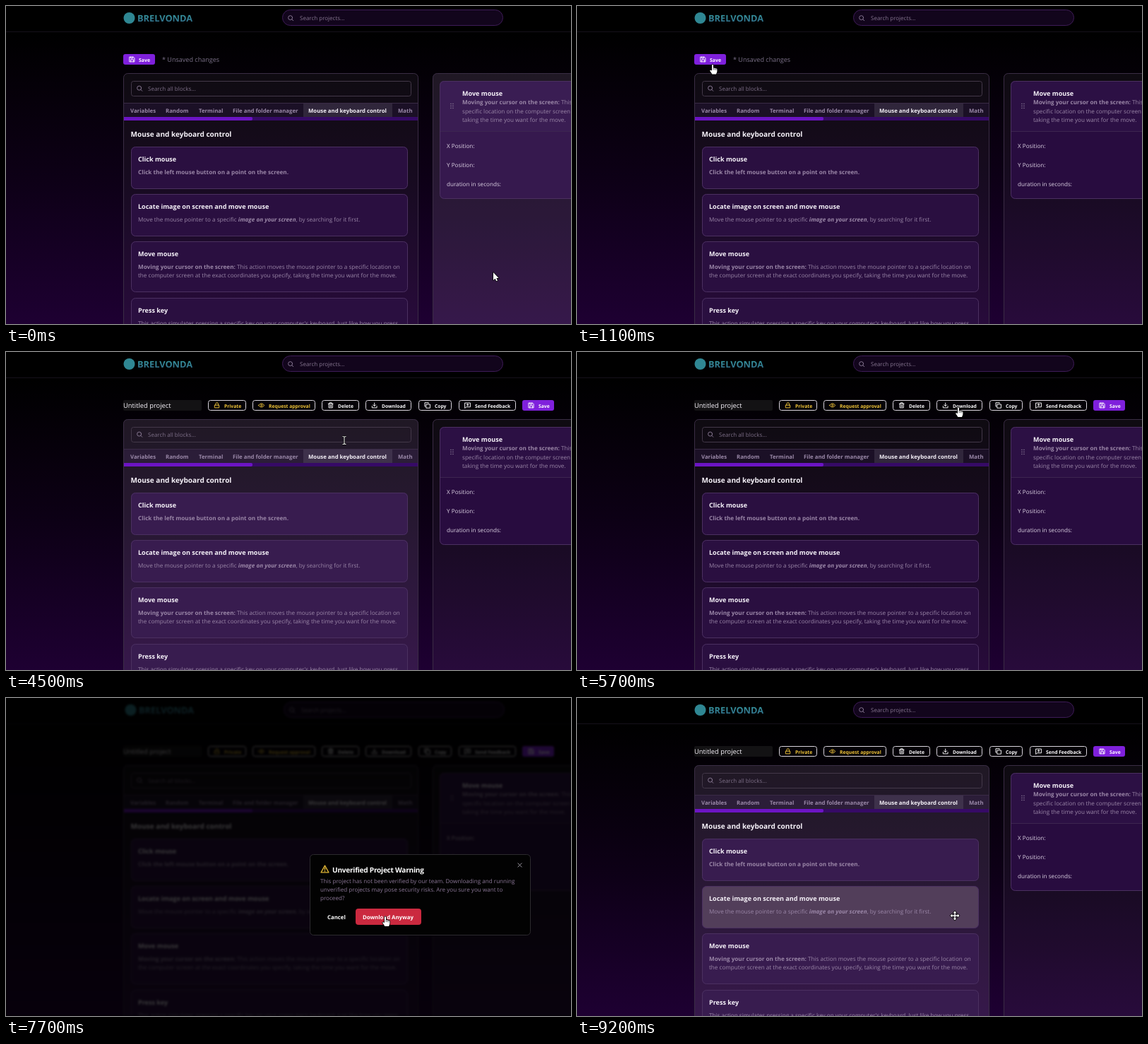
Animation, 800 px wide and 450 px high, one loop 9.3 s. Source, as an HTML page with a canvas:

```html
<!DOCTYPE html>
<html lang="en">
<head>
<meta charset="utf-8">
<title>Block editor</title>
<style>
html, body { margin: 0; width: 100%; height: 100%; overflow: hidden; background: #000; }
canvas { display: block; width: 800px; height: 450px; }
</style>
</head>
<body>
<canvas id="stage" width="800" height="450"></canvas>
<script>
const W = 800, H = 450, LOOP = 9300, STEP = 100;
const SAVED = 1800, OPEN = 5800, CLOSING = 8300, CLOSED = 8400;
const FONT = '"Open Sans", "Noto Sans", sans-serif';
const MUTED = '#9a86a7', BRIGHT = '#f6f2f9', YELLOW = '#f2c638', PURPLE = '#7f20dc';
const PANEL = 'rgba(255,255,255,.045)', PANEL_LINE = '#3a2d44', CARD_LINE = '#4b3060';

const out = document.getElementById('stage').getContext('2d');
const page = document.createElement('canvas');
page.width = W;
page.height = H;
let c = page.getContext('2d');

// Pointer path: time, x, y
const PATH = [
  [0, 690, 377], [900, 192, 82.5], [1900, 192, 82.5], [2300, 189, 77], [3000, 189, 77],
  [4300, 479, 125], [4600, 479, 125], [5400, 540, 78], [6400, 540, 78],
  [7500, 537, 309], [8400, 537, 309], [8700, 535, 308]
];
const LEFT = [166, 95, 418, 400], RIGHT = [604, 95, 240, 400];
const SEARCH = [177, 106, 397, 22], NAME = [166, 68, 111, 16], CONFIRM = [495, 298, 93, 23];
const CARDS = [
  { box: [177, 199, 392, 60], title: 'Click mouse',
    lines: [[['Click the left mouse button on a point on the screen.', 700]]] },
  { box: [177, 266, 392, 60], title: 'Locate image on screen and move mouse',
    lines: [[['Move the mouse pointer to a specific '], ['image on your screen', 700, 'italic '], [', by searching for it first.']]] },
  { box: [177, 333, 392, 72], title: 'Move mouse',
    lines: [[['Moving your cursor on the screen:', 700], [' This action moves the mouse pointer to a specific location on']],
      [['the computer screen at the exact coordinates you specify, taking the time you want for the move.']]] },
  { box: [177, 413, 392, 72], title: 'Press key',
    lines: [[["This action simulates pressing a specific key on your computer's keyboard. Just like how you press"]]] }
];
const TABS = [['Variables', 176], ['Random', 226], ['Terminal', 273], ['File and folder manager', 321],
  ['Mouse and keyboard control', 428], ['Math', 555]];
const BUTTONS = [['Private', 286, 54, 'lock'], ['Request approval', 349, 89, 'eye'], ['Delete', 447, 53, 'bin'],
  ['Download', 509, 65, 'down'], ['Copy', 584, 47, 'copy'], ['Send Feedback', 641, 81, 'note'], ['Save', 731, 45, 'disk']];

// Icons on a 24 unit grid
const ICONS = {
  lock: 'M4 11h16v10H4zM7 11V7a5 5 0 0 1 10 0v4',
  eye: 'M1 12Q12 -2 23 12Q12 26 1 12zM15 12a3 3 0 1 1-6 0a3 3 0 1 1 6 0',
  bin: 'M3 6h18M5 6v15h14V6M8 6V2h8v4M10 11v6M14 11v6',
  down: 'M12 3v12M7 10l5 5l5-5M3 15v6h18v-6',
  copy: 'M8 8h14v14H8zM4 16H2V2h14v2',
  note: 'M2 3h20v15H7l-5 4zM12 6v8M8 10h8',
  disk: 'M3 3h14l4 4v14H3zM7 3v5h8V3M7 21v-8h10v8',
  find: 'M19 11a8 8 0 1 1-16 0a8 8 0 1 1 16 0M17 17l5 5',
  warn: 'M12 3L22 21H2zM12 9v5M12 17v1',
  cross: 'M5 5l14 14M19 5L5 19'
};
const POINTERS = {
  arrow: 'M0 0V11L2.6 8.7L4.2 12.2L6 11.4L4.4 8H7.6z',
  hand: 'M-1 1Q0 -.6 1 1V5.2Q2.2 4.4 3 5.6Q4.2 5 4.9 6.2Q6.4 5.8 6.4 7.4V10Q6 11.8 5 14H-.7Q-2 11.5 -3.8 9.2Q-3.6 7.4 -1 9z',
  ibeam: 'M-2.5 -5.5Q0 -5.5 0 -4.5Q0 -5.5 2.5 -5.5M0 -4.5V4.5M-2.5 5.5Q0 5.5 0 4.5Q0 5.5 2.5 5.5',
  move: 'M0 -6.5L2.4 -3.8H.7V-.7H3.8V-2.4L6.5 0L3.8 2.4V.7H.7V3.8H2.4L0 6.5L-2.4 3.8H-.7V.7H-3.8V2.4L-6.5 0L-3.8 -2.4V-.7H-.7V-3.8H-2.4z'
};

const inside = ([x, y, w, h], p) => p.x >= x && p.x <= x + w && p.y >= y && p.y <= y + h;

function pointer(t) {
  let i = PATH.length - 1;
  while (i > 0 && PATH[i][0] > t) i--;
  const a = PATH[i], b = PATH[i + 1] || a;
  const k = b === a ? 0 : (t - a[0]) / (b[0] - a[0]);
  const e = k * k * (3 - 2 * k);
  return { x: a[1] + (b[1] - a[1]) * e, y: a[2] + (b[2] - a[2]) * e };
}

const modal = t => t >= OPEN && t < CLOSED;

// Hover strength: share of the last 300 ms spent over a box
function hover(box, t) {
  let n = 0;
  for (let i = 0; i < 15; i++) {
    const s = Math.max(0, t - i * 20);
    if (!modal(s) && inside(box, pointer(s))) n++;
  }
  return n / 15;
}

const panelGlow = (panel, t) => `rgba(200,150,225,${.09 * hover(panel, t)})`;

function pointerKind(t, p) {
  if (modal(t)) return inside(CONFIRM, p) ? 'hand' : 'arrow';
  if (t < SAVED && inside([166, 68, 45, 16], p)) return 'hand';
  if (t >= SAVED) {
    if (inside(NAME, p)) return 'ibeam';
    if (BUTTONS.some(b => inside([b[1], 68, b[2], 16], p))) return 'hand';
  }
  if (inside(SEARCH, p)) return 'ibeam';
  return CARDS.some(k => inside(k.box, p)) ? 'move' : 'arrow';
}

function text(s, x, y, size, color, weight = 400, style = '') {
  c.font = `${style}${weight} ${size}px ${FONT}`;
  c.textRendering = 'geometricPrecision';
  c.fillStyle = color;
  c.fillText(s, x, y);
  return x + c.measureText(s).width;
}

function runs(parts, x, y) {
  for (const [s, weight = 400, style = ''] of parts) x = text(s, x, y, 8.13, MUTED, weight, style);
}

function box([x, y, w, h], r, fill, line) {
  c.beginPath();
  c.roundRect(line ? x + .5 : x, line ? y + .5 : y, line ? w - 1 : w, line ? h - 1 : h, r);
  if (fill) { c.fillStyle = fill; c.fill(); }
  if (line) { c.strokeStyle = line; c.lineWidth = 1; c.stroke(); }
}

function icon(name, cx, cy, size, color) {
  c.save();
  c.translate(cx - size / 2, cy - size / 2);
  c.scale(size / 24, size / 24);
  c.strokeStyle = color;
  c.lineWidth = 2.5;
  c.lineCap = c.lineJoin = 'round';
  c.stroke(new Path2D(ICONS[name]));
  c.restore();
}

function vertical(y0, y1, ...stops) {
  const g = c.createLinearGradient(0, y0, 0, y1);
  stops.forEach((s, i) => g.addColorStop(i / (stops.length - 1), s));
  return g;
}

function drawHeader(t) {
  c.save();
  if (modal(t)) c.translate(2, 0);
  c.fillStyle = '#2f8793';
  c.beginPath();
  c.arc(174.5, 17, 8, 0, 7);
  c.fill();
  text('BRELVONDA', 186, 21.5, 12.8, vertical(9, 24, '#38a0a5', '#2f6a86'), 700);
  box([391, 5, 313, 23], 11, '#12051c', '#3e1c58');
  icon('find', 403, 17, 9, '#8c7c98');
  text('Search projects...', 416, 20, 8, '#85758f');
  c.restore();
  c.fillStyle = '#15101a';
  c.fillRect(0, 36, W, 1);
}

function drawToolbar(t) {
  if (t < SAVED) {
    box([166, 68, 45, 15], 3, PURPLE);
    icon('disk', 178.5, 75.5, 9, '#fff');
    text('Save', 188, 78.5, 6.9, '#fff', 700);
    text('* Unsaved changes', 221, 79, 9.05, '#7b7088');
    return;
  }
  box([166, 68, 111, 15], 2, '#131214');
  text('Untitled project', 166, 79, 9.35, BRIGHT);
  BUTTONS.forEach(([label, x, w, name], i) => {
    const ink = i < 2 ? YELLOW : '#fff';
    if (label === 'Save') box([x, 68, w, 15], 3, PURPLE);
    else box([x, 68, w, 15], 3, '#050208', '#d9d4dc');
    icon(name, x + 12.7, 75.5, 9, ink);
    text(label, x + 23, 78.5, 6.75, ink, 700);
  });
}

function drawLeft(t) {
  c.save();
  c.beginPath();
  c.roundRect(...LEFT, 6);
  c.clip();
  box(LEFT, 6, PANEL);
  c.fillStyle = '#1b1026';
  c.fillRect(166, 138, 418, 19);
  c.fillStyle = '#30263b';
  c.fillRect(421, 138, 126, 19);
  for (const k of CARDS) box(k.box, 6, '#2a0f40');
  c.fillStyle = panelGlow(LEFT, t);
  c.fillRect(...LEFT);
  c.fillStyle = '#3a2b46';
  c.fillRect(166, 137, 418, 1);
  c.fillStyle = '#360a66';
  c.fillRect(167, 157, 417, 5);
  c.fillStyle = '#6c14c4';
  c.beginPath();
  c.roundRect(167, 157, 182, 5, [0, 2, 2, 0]);
  c.fill();

  box(SEARCH, 3, null, '#433849');
  icon('find', 189, 116.5, 9, '#8c7c98');
  text('Search all blocks...', 201, 120, 8, '#7d6f87');
  TABS.forEach(([s, x], i) => text(s, x, 150.5, 7.8, i === 4 ? BRIGHT : '#9a88a8', 700));
  text('Mouse and keyboard control', 176.5, 184.5, 10.05, BRIGHT, 700);

  for (const k of CARDS) {
    const y = k.box[1];
    box(k.box, 6, `rgba(150,150,120,${.28 * hover(k.box, t)})`, CARD_LINE);
    text(k.title, 187, y + 21, 9.05, BRIGHT, 700);
    k.lines.forEach((line, i) => runs(line, 187, y + 39 + i * 12));
  }
  c.restore();
  box(LEFT, 6, null, PANEL_LINE);
}

function drawRight(t) {
  const card = [614, 106, 230, 167];
  box(RIGHT, 6, PANEL);
  box(card, 6, '#280c3f');
  box([614, 106, 230, 72], [6, 6, 0, 0], '#2c1044');
  box(RIGHT, 6, panelGlow(RIGHT, t), PANEL_LINE);
  box(card, 6, null, CARD_LINE);
  c.fillStyle = '#3d2550';
  c.fillRect(615, 177, 200, 1);
  c.fillStyle = '#8c7c98';
  for (let i = 0; i < 6; i++) c.fillRect(629.3 + i % 2 * 3, 137.8 + (i >> 1) * 3, 1.3, 1.3);
  text('Move mouse', 646, 127, 9.05, BRIGHT, 700);
  runs([['Moving your cursor on the screen:', 700], [' This action moves']], 646, 139);
  runs([['specific location on the computer screen at the']], 646, 151.5);
  runs([['taking the time you want for the move.']], 646, 164);
  ['X Position:', 'Y Position:', 'duration in seconds:'].forEach((s, i) => text(s, 624, 201 + i * 27, 8.15, '#dcd2e3'));
}

function drawPage(t) {
  c.fillStyle = vertical(37, H, '#000', '#0d0016', '#1e0032');
  c.fillRect(0, 0, W, H);
  c.fillStyle = '#000';
  c.fillRect(0, 0, W, 36);
  drawHeader(t);
  drawToolbar(t);
  drawLeft(t);
  drawRight(t);
}

function drawDialog(t, level) {
  c.save();
  c.globalAlpha = level;
  const s = .94 + .06 * level;
  c.translate(586.5, 278.5);
  c.scale(s, s);
  c.translate(-586.5, -278.5);
  box([430, 221, 313, 115], 5, '#020202', '#2c2a2e');
  icon('cross', 727.5, 236.5, 9, '#a39da8');
  icon('warn', 451.5, 242, 13, '#dcb234');
  c.letterSpacing = '-0.25px';
  text('Unverified Project Warning', 462, 246.5, 10.1, '#fff', 700);
  c.letterSpacing = '0px';
  ['This project has not been verified by our team. Downloading and running',
    'unverified projects may pose security risks. Are you sure you want to',
    'proceed?'].forEach((line, i) => text(line, 445, 261.5 + i * 12, 8.1, '#8b7797'));
  text('Cancel', 455, 312.5, 7.8, '#fff', 700);
  box(CONFIRM, 4, inside(CONFIRM, pointer(t)) ? '#cb293f' : '#e12d47');
  text('Download Anyway', 505, 312.5, 7.8, '#fff', 700);
  c.restore();
}

function drawPointer(t) {
  const p = pointer(t), kind = pointerKind(t, p), shape = new Path2D(POINTERS[kind]);
  c.save();
  c.translate(p.x, p.y);
  c.lineJoin = 'round';
  c.strokeStyle = '#000';
  c.lineWidth = kind === 'ibeam' ? 2.6 : 1.5;
  c.stroke(shape);
  if (kind === 'ibeam') {
    c.strokeStyle = '#eee';
    c.lineWidth = 1.1;
    c.stroke(shape);
  } else {
    c.fillStyle = '#fff';
    c.fill(shape);
  }
  if (kind === 'hand') {
    c.lineWidth = .6;
    c.stroke(new Path2D('M1 5V8M3 5.8V8.2M4.9 6.4V8.4'));
  }
  c.restore();
}

function dialogLevel(t) {
  if (!modal(t)) return 0;
  return t >= CLOSING ? .25 : Math.min(1, (t - OPEN + STEP) / 300);
}

function render(t) {
  const level = dialogLevel(t);
  c = page.getContext('2d');
  drawPage(t);
  c = out;
  c.filter = level && t < CLOSING ? `blur(${1.6 * level}px)` : 'none';
  c.drawImage(page, 0, 0);
  c.filter = 'none';
  if (level) {
    c.fillStyle = `rgba(0,0,0,${.77 * level * level})`;
    c.fillRect(0, 0, W, H);
    drawDialog(t, level);
  }
  drawPointer(t);
}

const start = performance.now();
function tick() {
  const t = (performance.now() - start) % LOOP;
  render(Math.floor(t / STEP) * STEP);
  requestAnimationFrame(tick);
}
tick();
</script>
</body>
</html>
```
